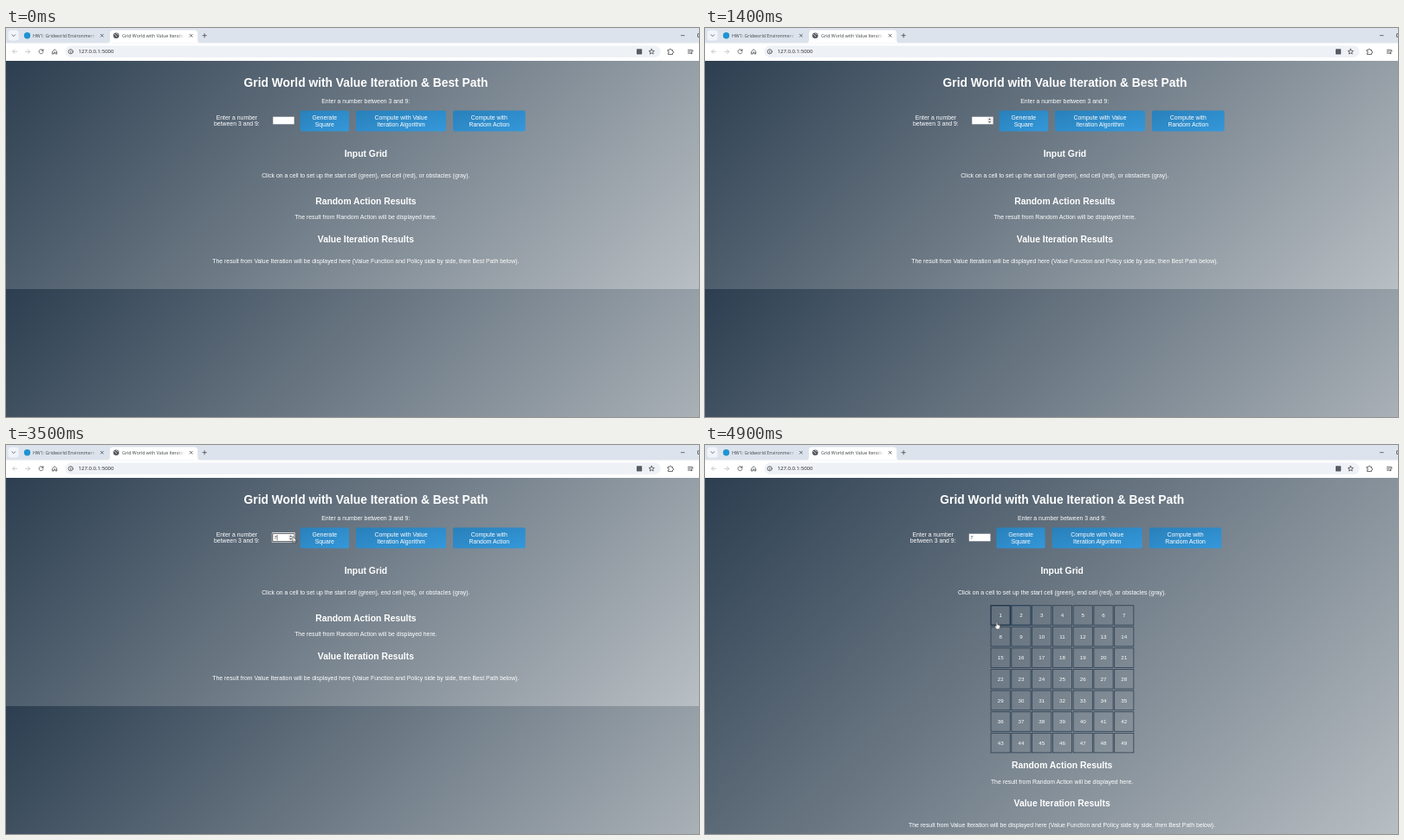
An HTML page that plays this animation: 800 px wide and 450 px high, repeating every 5000 ms.

```html
<!DOCTYPE html>
<html lang="en">
<head>
<meta charset="utf-8">
<title>Grid World with Value Iteration</title>
<style>
html, body { margin: 0; width: 100%; height: 100%; overflow: hidden; }
.stage { position: relative; width: 800px; height: 450px; overflow: hidden; }
.stage > * { position: absolute; left: 0; top: 0; }
.bg {
  top: 38px; width: 800px; height: 412px;
  background: linear-gradient(135deg, #2c3e50, #bdc3c7) 0 0 / 831px 264px;
}
svg { display: block; }
.page text { font: 6.88px "Liberation Sans", Arial, sans-serif; fill: #fff; text-anchor: middle; }
.page .h1 { font-size: 13.8px; font-weight: bold; }
.page .h2 { font-size: 10.37px; font-weight: bold; }
.page .num { font-size: 5.75px; fill: #333; text-anchor: start; }
.page .cells text { font-size: 6.2px; }
.cells rect { fill: none; stroke: #2c3e50; stroke-width: .8; }
.ui text { font: 5.25px "Open Sans", "Noto Sans", sans-serif; fill: #3c4043; }
.ui .url { font-size: 6.05px; fill: #202124; }
.icon { fill: none; stroke: #474b50; stroke-width: .8; stroke-linecap: round; stroke-linejoin: round; }
.off { stroke: #b9bcc1; }
.cursor path { fill: #fff; stroke: #111; stroke-width: .55; stroke-linejoin: round; }

.bg, .shift, .low, .cells, .spin, .ring, .caret, .digits, .gen, .cursor, .arrow, .hand, .c1, .c2 {
  animation: 5s step-end infinite;
}
.bg { animation-name: bg; }
.shift { animation-name: shift; }
.low { animation-name: low; }
.cells { animation-name: cells; }
.spin { animation-name: spin; }
.ring { animation-name: ring; }
.caret { animation-name: caret; }
.digits { animation-name: digits; }
.gen { animation-name: gen; transform-box: fill-box; transform-origin: center; }
.cursor { animation-name: move; }
.arrow { animation-name: arrow; }
.hand { animation-name: hand; }
.cells .c1 { animation-name: c1; }
.cells .c2 { animation-name: c2; }

@keyframes bg { 84%, 100% { background-size: 824px 435px; } }
@keyframes shift { 0% { transform: none; } 84%, 100% { transform: translate(-3.25px, 0); } }
@keyframes low { 0% { transform: none; } 84%, 100% { transform: translate(0, 170.6px); } }
@keyframes cells { 0% { visibility: hidden; } 84%, 100% { visibility: visible; } }
@keyframes spin { 0%, 76%, 100% { visibility: hidden; } 16% { visibility: visible; } }
@keyframes ring { 0%, 80%, 100% { visibility: hidden; } 32% { visibility: visible; } }
@keyframes caret {
  0%, 50%, 80%, 100% { visibility: hidden; }
  38%, 58% { visibility: visible; }
}
@keyframes digits {
  0% { transform: translate(0, 20px); }
  32% { transform: translate(0, 0); }
  38% { transform: translate(0, -20px); }
  58% { transform: translate(0, -40px); }
  64% { transform: translate(0, -60px); }
  70%, 100% { transform: translate(0, -80px); }
}
@keyframes gen {
  0%, 90%, 100% { transform: scale(1); filter: none; }
  76%, 88% { transform: scale(1.02); filter: drop-shadow(0 .8px 1px #0004); }
  78% { transform: scale(1.04); filter: drop-shadow(0 1.2px 1.4px #0005); }
  80% { transform: scale(1.05); filter: drop-shadow(0 1.6px 1.7px #0006); }
}
@keyframes move {
  0% { transform: translate(330.8px, 105.6px); }
  76% { transform: translate(345px, 106px); }
  78% { transform: translate(360px, 105.4px); }
  80% { transform: translate(366.4px, 105px); }
  84% { transform: translate(367.2px, 106.6px); }
  86% { transform: translate(367.2px, 110px); }
  88% { transform: translate(367px, 121px); }
  90% { transform: translate(367px, 135px); }
  92% { transform: translate(366px, 155px); }
  94% { transform: translate(364px, 186px); }
  96% { transform: translate(360px, 196px); }
  98%, 100% { transform: translate(336.8px, 204.2px); }
}
@keyframes arrow {
  0%, 76%, 94%, 100% { visibility: hidden; }
  32%, 88% { visibility: visible; }
}
@keyframes hand {
  0%, 88% { visibility: hidden; }
  76%, 94%, 100% { visibility: visible; }
}
@keyframes c1 { 98%, 100% { stroke: #1c3044; stroke-width: 1.2; } }
@keyframes c2 { 94%, 100% { stroke: #213c58; stroke-width: 1.1; } }
</style>
</head>
<body>
<div class="stage">
<div class="bg"></div>
<svg width="800" height="450" viewBox="0 0 800 450">
  <defs>
    <linearGradient id="blue" x1="0" y1="0" x2="1" y2="1">
      <stop offset="0" stop-color="#2980b9"/><stop offset="1" stop-color="#3498db"/>
    </linearGradient>
    <linearGradient id="fadeGray"><stop offset="0" stop-color="#dde3ec" stop-opacity="0"/><stop offset="1" stop-color="#dde3ec"/></linearGradient>
    <linearGradient id="fadeWhite"><stop offset="0" stop-color="#fff" stop-opacity="0"/><stop offset="1" stop-color="#fff"/></linearGradient>
  </defs>

  <g class="page shift">
    <text class="h1" x="415.5" y="67.9">Grid World with Value Iteration &amp; Best Path</text>
    <text x="415.3" y="87.1">Enter a number between 3 and 9:</text>
    <text x="266.4" y="105.6">Enter a number</text>
    <text x="266.4" y="113.4">between 3 and 9:</text>

    <g class="ring">
      <rect x="306.8" y="101.3" width="27.2" height="11.3" rx="1.2" fill="#fff"/>
      <rect x="307.4" y="101.9" width="26" height="10.1" rx=".8" fill="#181818"/>
    </g>
    <rect x="308.1" y="102.7" width="24.7" height="8.6" fill="#fff" stroke="#8a8f96" stroke-width=".3"/>
    <svg x="308" y="102" width="25" height="9.4">
      <g class="digits">
        <text class="num" x="1.5" y="7.1">3</text>
        <text class="num" x="1.5" y="27.1">4</text>
        <text class="num" x="1.5" y="47.1">5</text>
        <text class="num" x="1.5" y="67.1">6</text>
        <text class="num" x="1.5" y="87.1">7</text>
      </g>
    </svg>
    <rect class="caret" x="312.8" y="104" width=".5" height="6.4" fill="#111"/>
    <g class="spin">
      <rect x="326" y="103.4" width="5.6" height="7.2" fill="#efefef"/>
      <path d="M327.1 106.2l1.5-1.8 1.5 1.8zM327.1 107.9l1.5 1.8 1.5-1.8z" fill="#505050"/>
    </g>

    <g class="gen">
      <rect x="339.6" y="95.6" width="56.4" height="23.8" rx="2" fill="url(#blue)"/>
      <text x="367.8" y="105.8">Generate</text>
      <text x="367.8" y="113.6">Square</text>
    </g>
    <rect x="404" y="95.6" width="104" height="23.8" rx="2" fill="url(#blue)"/>
    <text x="456" y="105.8">Compute with Value</text>
    <text x="456" y="113.6">Iteration Algorithm</text>
    <rect x="516" y="95.6" width="83.6" height="23.8" rx="2" fill="url(#blue)"/>
    <text x="557.8" y="105.8">Compute with</text>
    <text x="557.8" y="113.6">Random Action</text>

    <text class="h2" x="415.4" y="148.7">Input Grid</text>
    <text x="415.3" y="172.6">Click on a cell to set up the start cell (green), end cell (red), or obstacles (gray).</text>
    <g class="cells" id="cells"></g>
    <g class="low">
      <text class="h2" x="415.4" y="203.8">Random Action Results</text>
      <text x="415.3" y="221.1">The result from Random Action will be displayed here.</text>
      <text class="h2" x="415.4" y="247.6">Value Iteration Results</text>
      <text x="415.3" y="271.7">The result from Value Iteration will be displayed here (Value Function and Policy side by side, then Best Path below).</text>
    </g>
  </g>

  <g class="ui">
    <rect width="800" height="38" fill="#fff"/>
    <rect width="800" height="17.5" fill="#dde3ec"/>
    <rect x="2.6" y="2.6" width="12" height="12" rx="3.6" fill="#f1f4f9"/>
    <path class="icon" d="M7 7.8l1.8 1.8 1.8-1.8"/>
    <circle cx="24.5" cy="8.7" r="3.7" fill="#1f94d2"/>
    <text x="31" y="10.7">HW1: Gridworld Environment</text>
    <rect x="95" y="4" width="9" height="10" fill="url(#fadeGray)"/>
    <rect x="104" y="4" width="4" height="10" fill="#dde3ec"/>
    <path class="icon" d="M109.3 7.2l3 3m0-3l-3 3"/>
    <path d="M116.5 17.6q3.5 0 3.5-3.5V6q0-3.6 3.6-3.6h94Q221.200 2.400 221.200 6v8.100q0 3.500 3.500 3.500z" fill="#fff"/>
    <circle cx="127.200" cy="8.700" r="3.300" fill="#50555b"/>
    <path d="M124.800 7.300q1.500.2 2 1.500t1.300 1.200M127.200 5.900q.2 1.300 2.300 1.500" fill="none" stroke="#fff" stroke-width=".7"/>
    <text x="134" y="10.700">Grid World with Value Iteration</text>
    <rect x="197" y="4" width="9" height="10" fill="url(#fadeWhite)"/>
    <rect x="206" y="4" width="5" height="10" fill="#fff"/>
    <path class="icon" d="M212.200 7.200l3 3m0-3l-3 3M227 8.700h4.400m-2.200-2.200v4.400"/>
    <path class="icon" d="M779.300 8.700h3.800M800 6.800h-1.400v3.600h1.400" stroke-width=".6"/>

    <rect x="68.500" y="20.600" width="687" height="13.400" rx="6.700" fill="#eef1f6"/>
    <path class="icon off" d="M12.500 27.300H7.700m2.200-2.300l-2.300 2.300 2.300 2.300M22.700 27.300h4.800m-2.200-2.300l2.300 2.300-2.300 2.300"/>
    <path class="icon" d="M42.700 25.900a2.500 2.500 0 1 0 .3 2M43 24.700v1.600h-1.600"/>
    <path class="icon" d="M53.700 27l2.500-2.300 2.500 2.300v3h-1.600v-1.900h-1.800V30h-1.600z"/>
    <circle class="icon" cx="74.700" cy="27.300" r="2.600" stroke-width=".7"/>
    <path class="icon" d="M74.700 27.300v1.200m0-2.500v.05" stroke-width=".6"/>
    <text class="url" x="83.500" y="29.400">127.0.0.1:5000</text>
    <rect x="728" y="24.200" width="6.200" height="6.200" rx=".6" fill="#565c64"/>
    <path class="icon" d="M745.300 24.300l.9 2 2.200.2-1.700 1.400.5 2.200-1.900-1.200-1.900 1.200.5-2.200-1.700-1.400 2.200-.2z" stroke-width=".65"/>
    <path class="icon" d="M764.300 25.400h1.600q0-1.300 1-1.300t1 1.300h1.600V27q1.200 0 1.200 1t-1.200 1v1.500h-5.200V29q1.200-.1 1.200-1t-1.200-1z"/>
    <path class="icon" d="M787.300 25.400h5m-5 1.900h3m-3 1.900h2.300M791.800 29.300v-2.700h1.300"/>
    <circle cx="791.100" cy="29.300" r=".9" fill="#474b50"/>
  </g>

  <g class="cursor">
    <path class="arrow" d="M0 0v7.200l1.700-1.500 1.100 2.500 1.100-.5-1.100-2.400h2.300z"/>
    <path class="hand" d="M-.8.8a.8.8 0 0 1 1.600 0v2.700l2.300.5q1.100.3.900 1.500L3.600 7.500 3 8.900H-.3L-2.400 6q-.6-1.100.3-1.300l1.300.8z"/>
  </g>
</svg>
</div>
<script>
const N = 7, NS = "http://www.w3.org/2000/svg";
const cells = document.getElementById("cells");

function add(tag, attrs) {
  const el = document.createElementNS(NS, tag);
  for (const key in attrs) el.setAttribute(key, attrs[key]);
  return cells.appendChild(el);
}

for (let i = 0; i < N * N; i++) {
  const x = 344.4 + (i % N) * 23.77, y = 197 + Math.floor(i / N) * 24.6;
  add("rect", { x: x - 11.1, y: y - 11.3, width: 22.2, height: 22.6, class: "c" + (i + 1) });
  add("text", { x, y: y + 2.2 }).textContent = i + 1;
}
</script>
</body>
</html>
```
